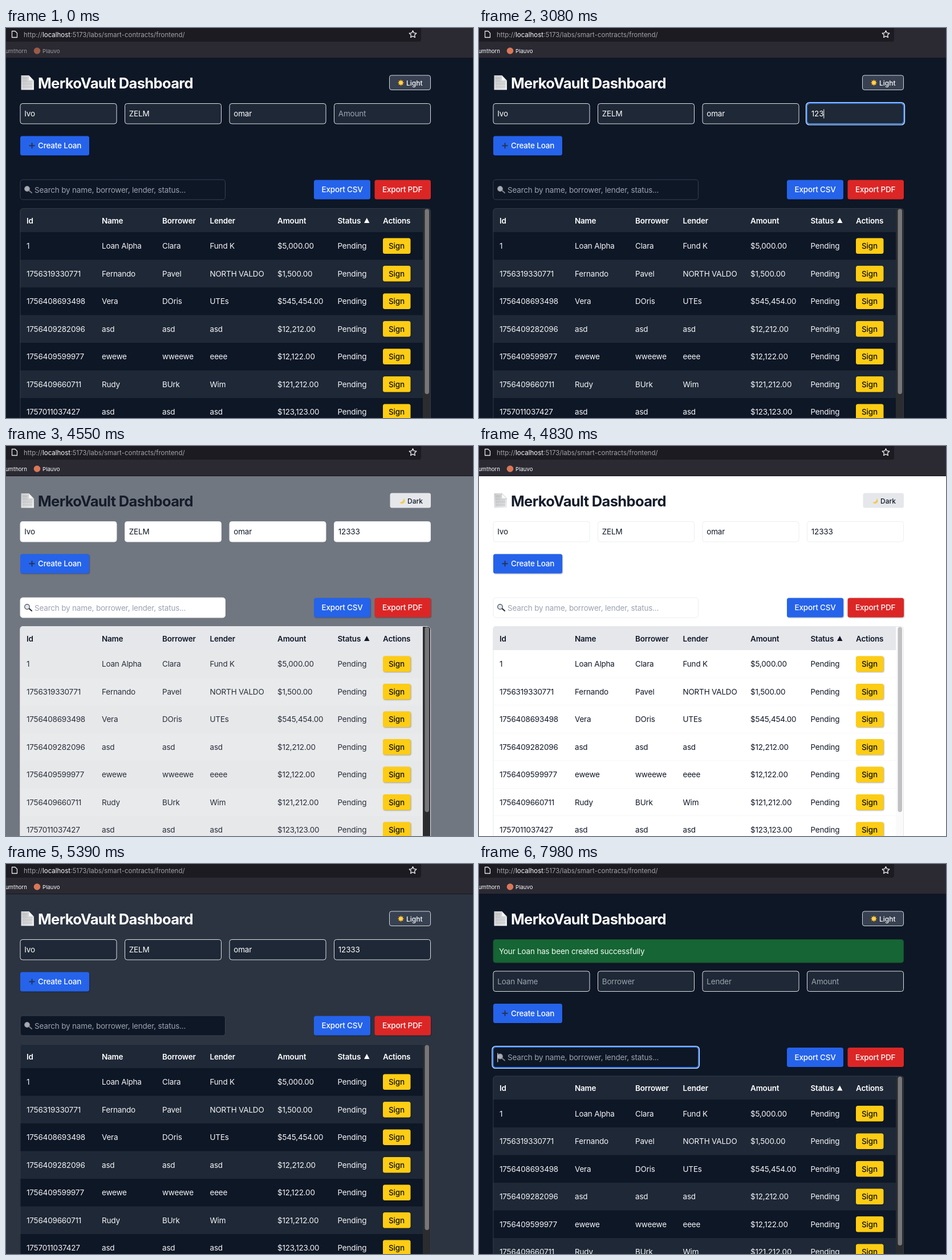
An HTML page with a canvas for the animation above (8 s loop, 819 by 684 pixels).

```html
<!DOCTYPE html>
<html lang="en">
<head>
<meta charset="utf-8">
<title>Loan dashboard</title>
<style>
html, body { margin: 0; width: 100%; height: 100%; overflow: hidden; background: #0e1726; }
canvas { display: block; }
</style>
</head>
<body>
<canvas id="stage" width="819" height="684"></canvas>
<script>
const c = document.getElementById('stage').getContext('2d');
const LOOP = 8000, TICK = 70;
const LIGHT_AT = 4455, DARK_AT = 5210, SAVED_AT = 6510;
const KEYS = [2730, 2870, 3080, 3290, 3430];
const CARET_ON = [[840, 1470], [1680, 2380], [2730, 4060], [7980, LOOP]];
const NAVY = [14, 23, 38], SLATE = [30, 40, 54], WHITE = [255, 255, 255];
const INK = [17, 24, 39], PALE = [245, 246, 248];
const FIELD_X = [24.5, 208, 391.5, 575];
const HINTS = ['Loan Name', 'Borrower', 'Lender', 'Amount'];
const COLS = [36, 168, 274, 357.5, 476, 581.5, 661];
const HEADS = ['Id', 'Name', 'Borrower', 'Lender', 'Amount', 'Status', 'Actions'];
const ROWS = [
  ['1', 'Loan Alpha', 'Clara', 'Fund K', '$5,000.00'],
  ['1756319330771', 'Fernando', 'Pavel', 'NORTH VALDO', '$1,500.00'],
  ['1756408693498', 'Vera', 'DOris', 'UTEs', '$545,454.00'],
  ['1756409282096', 'asd', 'asd', 'asd', '$12,212.00'],
  ['1756409599977', 'ewewe', 'wweewe', 'eeee', '$12,122.00'],
  ['1756409660711', 'Rudy', 'BUrk', 'Wim', '$121,212.00'],
  ['1757011037427', 'asd', 'asd', 'asd', '$123,123.00']
];

const mix = (a, b, p) => `rgb(${a.map((v, i) => Math.round(v + (b[i] - v) * p))})`;

// cubic-bezier(.4, 0, .2, 1)
function ease(x) {
  if (x <= 0) return 0;
  if (x >= 1) return 1;
  let lo = 0, hi = 1, s;
  for (let i = 0; i < 20; i++) {
    s = (lo + hi) / 2;
    const bx = 1.2 * s * (1 - s) ** 2 + .6 * s * s * (1 - s) + s ** 3;
    if (bx < x) lo = s; else hi = s;
  }
  return s * s * (3 - 2 * s);
}

const lightness = (t, ms) => t < DARK_AT ? ease((t - LIGHT_AT) / ms) : 1 - ease((t - DARK_AT) / ms);

// y is the middle of the capitals
function text(str, x, y, color, { size = 13.5, weight = 400, gap = -.19, align = 'left' } = {}) {
  c.font = `${weight} ${size}px Inter, sans-serif`;
  c.letterSpacing = gap + 'px';
  c.textAlign = align;
  c.fillStyle = color;
  c.fillText(str, x, y + size * .364);
  return c.measureText(str).width;
}

function box(x, y, w, h, r, fill, stroke, line = 1) {
  c.beginPath();
  c.roundRect(x, y, w, h, r);
  if (fill) { c.fillStyle = fill; c.fill(); }
  if (stroke) { c.strokeStyle = stroke; c.lineWidth = line; c.stroke(); }
}

function path(points, fill, stroke, line = 1) {
  c.beginPath();
  points.forEach(([x, y]) => c.lineTo(x, y));
  c.closePath();
  if (fill) { c.fillStyle = fill; c.fill(); }
  if (stroke) { c.strokeStyle = stroke; c.lineWidth = line; c.stroke(); }
}

function disc(x, y, r, fill) {
  c.beginPath();
  c.arc(x, y, r, 0, 7);
  c.fillStyle = fill;
  c.fill();
}

function star(x, y, n, outer, inner) {
  return Array.from({ length: 2 * n }, (_, i) => {
    const r = i % 2 ? inner : outer, a = Math.PI * (i / n - .5);
    return [x + r * Math.cos(a), y + r * Math.sin(a)];
  });
}

function shadowBox(x, y, w, h, fill) {
  c.save();
  c.shadowColor = 'rgba(0,0,0,.3)';
  c.shadowBlur = 2;
  c.shadowOffsetX = c.shadowOffsetY = 1;
  box(x, y, w, h, 3.5, fill);
  c.restore();
}

function button(label, x, y, w, h, fill, textX, color = '#fff') {
  shadowBox(x, y, w, h, fill);
  text(label, textX, y + h / 2, color, { weight: 500 });
}

function ring(x, y, w, h) {
  box(x - .5, y - .5, w + 1, h + 1, 4.5, null, '#2f7cf0', 2);
  box(x - 2, y - 2, w + 4, h + 4, 6, null, '#dcebff', 1.2);
}

function browser(active) {
  c.fillStyle = '#2b2a33';
  c.fillRect(0, 0, 819, 52);
  box(-5, -5, 733, 29, 4, '#1c1b22');
  path([[10.5, 5.5], [16, 5.5], [19.5, 9], [19.5, 16.5], [10.5, 16.5]], null, '#e4e4e8', 1.3);
  const url = { size: 11.5, gap: 0 };
  let x = 31;
  x += text('http://', x, 11.5, '#a3a2a9', url);
  x += text('localhost', x, 11.5, '#fbfbfe', url);
  text(':5173/labs/smart-contracts/frontend/', x, 11.5, '#a3a2a9', url);
  c.lineJoin = 'round';
  path(star(713.5, 11.2, 5, 6.6, 3.2), null, '#f0f0f4', 1.3);
  const ink = active ? '#fbfbfe' : '#9b9aa1', small = { size: 9.6, gap: 0 };
  text('Plumthorn', 37, 40.5, ink, { ...small, align: 'right' });
  disc(54.5, 40, 5.8, active ? '#d97757' : '#9a5a49');
  text('Plauvo', 64, 40.5, ink, small);
  c.fillStyle = '#17171d';
  c.fillRect(0, 52, 819, 1);
}

function pageIcon() {
  const g = c.createLinearGradient(26, 83, 48, 109);
  g.addColorStop(0, '#c9cacc');
  g.addColorStop(1, '#f1f1f2');
  path([[26.5, 83], [40, 83], [49, 92.5], [49, 108.5], [26.5, 108.5]], g);
  path([[40, 83], [49, 92.5], [39.5, 92]], '#fafafa', '#b4b5b8', .6);
  c.fillStyle = '#a6a8ac';
  for (let y = 87; y < 106; y += 2.5) c.fillRect(29, y, y < 93 ? 9 : 17, .7);
}

function header(light) {
  pageIcon();
  text('MerkoVault Dashboard', 56, 96.8, light ? '#151d2b' : '#fff', { size: 25.5, weight: 700, gap: -.65 });
  const small = { size: 12, weight: 500, gap: 0 };
  if (light) {
    box(673.5, 82.5, 71.5, 26, 3.5, '#e5e7eb');
    c.beginPath();
    c.arc(694.5, 96, 5, -.9, 2.5);
    c.quadraticCurveTo(697.5, 98.5, 697.6, 92.1);
    c.fillStyle = '#f7c948';
    c.fill();
    text('Dark', 704, 96.2, '#111827', small);
  } else {
    box(672.5, 83, 72, 25.5, 3.5, '#374151', '#d5d8dd');
    path(star(692.5, 96, 8, 5.8, 3.4), '#f5a623');
    disc(692.5, 96, 3.3, '#ffd44d');
    text('Light', 702, 96.2, '#fff', small);
  }
}

function caret(x, y, light) {
  c.fillStyle = light ? '#111827' : '#fff';
  c.fillRect(x, y - 8, 1, 16);
}

function form(t, light, caretOn) {
  const saved = t >= SAVED_AT;
  const typed = '12333'.slice(0, KEYS.filter(k => t >= k).length);
  const values = saved ? ['', '', '', ''] : ['Ivo', 'ZELM', 'omar', typed];
  const focus = t < 840 || t >= 4410 ? -1 : t < 1680 ? 2 : 3;
  values.forEach((value, i) => {
    const x = FIELD_X[i];
    box(x + .5, 132.5, 169, 35.5, 4, light ? '#fff' : '#1e2836', light ? '#eceef0' : '#dfe2e6');
    const w = text(value || HINTS[i], x + 7.8, 150.5, value ? (light ? '#111827' : '#fff') : '#9ca3af');
    if (i === focus) {
      ring(x + .5, 132.5, 169, 35.5);
      if (caretOn) caret(x + 7.8 + (value ? w : 0), 150.5, light);
    }
  });
  const hover = t >= 5810 && t < 6580;
  button('Create Loan', 25, 189.5, 121, 34, hover ? '#1d4ed8' : '#2563eb', 56);
  c.fillStyle = '#27324a';
  c.fillRect(40.5, 205.4, 10, 1.9);
  c.fillRect(44.6, 201.3, 1.9, 10);
}

function search(t, light, caretOn) {
  box(25, 266, 359.5, 35, 4.5, light ? '#fff' : mix(NAVY, WHITE, 0), light ? '#eceef0' : '#374151');
  c.lineCap = 'round';
  c.beginPath();
  c.moveTo(40.8, 285.4);
  c.lineTo(45, 289);
  c.strokeStyle = light ? '#2f3237' : '#777b82';
  c.lineWidth = 2.2;
  c.stroke();
  disc(37, 282, 4.4, light ? '#dfe7ee' : '#a9adb3');
  c.beginPath();
  c.arc(37, 282, 4.3, 0, 7);
  c.strokeStyle = light ? '#44484f' : '#8d9198';
  c.lineWidth = 1.2;
  c.stroke();
  text('Search by name, borrower, lender, status...', 50, 284, '#9ca3af');
  if (t >= 7980) {
    ring(25, 266, 359.5, 35);
    if (caretOn) caret(32.3, 284, light);
  }
  button('Export CSV', 540, 266.5, 99, 34, '#2563eb', 553.5);
  button('Export PDF', 646.5, 266.5, 98.5, 34, '#dc2626', 660);
}

function table(t, light) {
  const p = lightness(t, 150), ink = mix(PALE, INK, p);
  const paleBar = t >= 4620 && t < DARK_AT;
  c.save();
  c.beginPath();
  c.roundRect(24.5, 316, 720.5, 400, 5);
  c.clip();
  c.fillStyle = light ? '#e5e7eb' : '#1e2836';
  c.fillRect(24, 316, 707, 42);
  ROWS.forEach((row, i) => {
    const top = 358 + 48.5 * i, y = top + 24.5;
    c.fillStyle = mix(i % 2 ? SLATE : NAVY, WHITE, p);
    c.fillRect(24, top, 707, 49);
    if (p === 1) {
      c.fillStyle = '#f1f2f4';
      c.fillRect(24, top + 48, 707, 1);
    }
    [...row, 'Pending'].forEach((cell, k) => text(cell, COLS[k], y, ink));
    button('Sign', 661, y - 14, 48.5, 27.5, '#fdcc14', 671, '#111');
  });
  const headInk = light ? '#111827' : '#fff';
  HEADS.forEach((h, k) => text(h, COLS[k], 337.7, headInk, { weight: 600 }));
  path([[632.8, 333], [637.5, 342], [628, 342]], headInk);
  c.fillStyle = paleBar ? '#fafafa' : '#2b2c2f';
  c.fillRect(731, 316, 14, 400);
  box(734.5, 317.5, 7.5, t >= SAVED_AT ? 296 : 324.5, 3.7, paleBar ? '#c1c1c3' : '#77777a');
  c.restore();
  box(25, 316.5, 719.5, 400, 5, null, light ? '#e5e7eb' : '#303a49');
}

function draw(t) {
  const light = t >= LIGHT_AT && t < DARK_AT;
  const caretOn = CARET_ON.some(([a, b]) => t >= a && t < b);
  c.fillStyle = mix(NAVY, WHITE, lightness(t, 300));
  c.fillRect(0, 0, 819, 684);
  browser(t >= 840);
  header(light);
  c.save();
  if (t >= SAVED_AT) {
    box(25, 132.5, 719.5, 40.5, 4, '#166534', '#14532d');
    text('Your Loan has been created successfully', 35, 153.2, '#f0fdf4');
    c.translate(0, 55.5);
  }
  form(t, light, caretOn);
  search(t, light, caretOn);
  table(t, light);
  c.restore();
}

function frame() {
  draw(Math.floor(performance.now() % LOOP / TICK) * TICK);
  requestAnimationFrame(frame);
}
frame();
</script>
</body>
</html>
```
